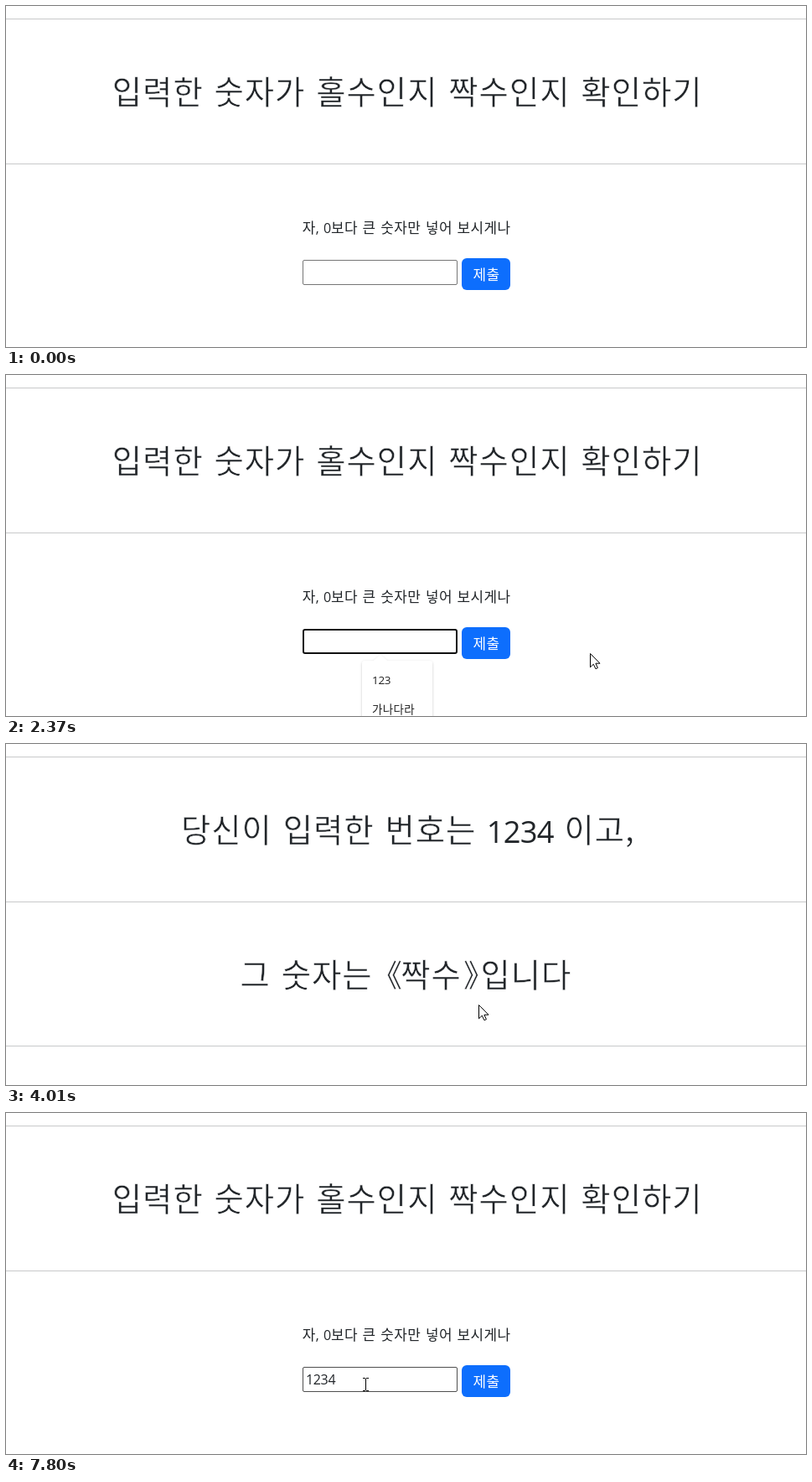
Recreate the animation shown at these times as an HTML page. Size 955 by 407 pixels, loop 8 s.

```html
<!DOCTYPE html>
<html lang="ko">
<head>
<meta charset="utf-8">
<title>홀수 짝수 확인</title>
<style>
html, body { margin: 0; width: 100%; height: 100%; overflow: hidden; background: #fff; }
svg { display: block; }
text {
  font-family: "Noto Sans CJK KR", "Noto Sans CJK", "Noto Sans KR", sans-serif;
  font-weight: 350; letter-spacing: .0253em; fill: #212529;
  text-spacing-trim: space-all; white-space: pre;
}
/* A thin white outline slims the strokes of the heading. */
.big { font-size: 38.4px; word-spacing: .03em; stroke: #fff; stroke-width: .5px; }
.mid { font-size: 16.93px; word-spacing: .03em; }
.num { font-family: "Open Sans", "Noto Sans", sans-serif; font-weight: 400; letter-spacing: -.022em; }
.gap { word-spacing: .12em; }
.hint { font-size: 13.5px; fill: #222; }
.quote { font-size: 37px; }
</style>
</head>
<body>
<svg width="955" height="407" viewBox="0 0 955 407">
  <defs>
    <filter id="soft" x="-20%" y="-20%" width="140%" height="140%">
      <feDropShadow dx="0" dy="1" stdDeviation="1.5" flood-color="#000" flood-opacity=".22"/>
    </filter>
  </defs>
  <rect width="955" height="407" fill="#fff"/>
  <g fill="#c8c9ca">
    <rect y="15" width="955" height="1"/>
    <rect y="188" width="955" height="1"/>
  </g>

  <g id="ask">
    <text class="big" x="126.8" y="117">입력한 숫자가 홀수인지 짝수인지 확인하기</text>
    <text class="mid" x="353.8" y="271">자<tspan class="num gap" font-size="16">, 0</tspan>보다 큰 숫자만 넣어 보시게나</text>
    <rect id="field" fill="#fff"/>
    <text id="typed" class="num" x="358" y="324" font-size="16"></text>
    <rect id="button" x="544" y="301" width="58" height="38" rx="6"/>
    <text class="mid" x="557.6" y="326.5" style="fill:#fff">제출</text>
    <g id="list">
      <path id="panel" fill="#fff" filter="url(#soft)"/>
      <text class="hint num" x="437" y="369">123</text>
      <text id="second" class="hint" x="437" y="404">가나다라</text>
    </g>
  </g>

  <g id="answer">
    <rect y="360" width="955" height="1" fill="#c8c9ca"/>
    <text class="big" x="209" y="117">당신이 입력한 번호는</text>
    <text class="num" x="573.8" y="118" font-size="36.3">1234</text>
    <text class="big" x="666.4" y="117">이고,</text>
    <text class="big" x="279.5" y="290">그 숫자는</text>
    <text class="big quote" x="436" y="290">《</text>
    <text class="big" x="471.3" y="290">짝수</text>
    <text class="big quote" x="546" y="290">》</text>
    <text class="big" x="566.5" y="290">입니다</text>
  </g>

  <g id="mouse">
    <circle id="press" cx="-2.5" cy="-.5" r="12" fill="#ff0" fill-opacity=".5"/>
    <path id="arrow" d="M.5 .5V16.8L4.3 13.2 6.9 18.7 9.4 17.6 6.9 12.2H12z" fill="#fff" stroke="#000"/>
    <path id="beam" d="M-3.5 -7.5H-.5M.5 -7.5H3.5M0 -7V7M-3.5 7.5H-.5M.5 7.5H3.5" fill="none" stroke="#000"/>
    <g id="hand" stroke="#000">
      <path d="M-2 1.5a2 2 0 0 1 4 0V8c0-2 4-1.5 4 .5 0-1.7 3.5-1.2 3.5.8 0-1.5 3-1 3 1V15c0 3-2 4.5-2 7H1.5c0-3-7-8-7-10.5 0-2 2.5-1.5 3.5.5z" fill="#fff" stroke-width="1.2"/>
      <path d="M2 8V11.5M6 8.5V11.5M9.5 9.3V12" fill="none"/>
    </g>
  </g>
</svg>
<script>
const LOOP = 8000, STEP = 70, FIRST = 860;
const $ = id => document.getElementById(id);
const show = (id, on) => $(id).style.display = on ? '' : 'none';
const within = (t, a, b) => t >= a && t < b;
const clamp = k => Math.max(0, Math.min(1, k));
const ramp = (t, start) => clamp((t - start) / 150);

function attrs(id, o) {
  for (const k in o) $(id).setAttribute(k, o[k]);
}

const easeIn = k => k ** 2.77;
const easeOut = k => 1 - (1 - k) ** 2;
const easeBoth = k => k * k * (3 - 2 * k);

// The pointer rests at the end of a move until "until".
const inField = [472.5, 317], aside = [697, 332], onButton = [564, 311];
const moves = [
  { from: 860, to: 1200, until: 1870, a: [538, 394], b: inField, ease: easeOut, bend: .4 },
  { from: 1870, to: 2330, until: 2930, a: inField, b: aside, ease: easeBoth, bend: .3 },
  { from: 2930, to: 3310, until: 4010, a: aside, b: onButton, ease: easeBoth, bend: 0 },
  { from: 4010, to: 4570, until: 4640, a: onButton, b: [127, 0], ease: easeIn, bend: .6 },
  { from: 7020, to: 7790, until: LOOP, a: [190, 92], b: [429.5, 324], ease: easeOut, bend: .3 }
];

function pointer(t) {
  const m = moves.find(m => within(t, m.from, m.until));
  if (!m) return null;
  // The screen refreshes the pointer in fixed steps.
  const snapped = FIRST + Math.floor((t - FIRST + 10) / STEP) * STEP;
  const u = m.ease(clamp((snapped - m.from) / (m.to - m.from)));
  const v = u + m.bend * u * (1 - u);
  return [m.a[0] + (m.b[0] - m.a[0]) * u, m.a[1] + (m.b[1] - m.a[1]) * v];
}

// Button shade: 0 normal, 1 hover, 1.35 pressed.
const shade = t => ramp(t, 2060) - ramp(t, 2130) + ramp(t, 3170) - ramp(t, 6810)
  + .35 * (ramp(t, 3740) - ramp(t, 6740));

const inside = (p, [x, y, w, h]) => p && within(p[0], x, x + w) && within(p[1], y, y + h);
const FIELD = [354, 303, 185, 30], BUTTON = [544, 301, 58, 38];
const ASK_TEXT = [[126, 82, 704, 44], [354, 255, 248, 22]];
const ANSWER_TEXT = [[209, 82, 538, 44], [280, 255, 396, 44]];

const panelPath = bottom =>
  `M429 341H439L447 334 455 341H505a4 4 0 0 1 4 4V${bottom - 4}a4 4 0 0 1-4 4H429a4 4 0 0 1-4-4V345a4 4 0 0 1 4-4z`;

function draw(t) {
  const asking = !within(t, 3880, 6890);
  show('ask', asking);
  show('answer', !asking);

  const p = pointer(t);
  const focused = within(t, 1740, 3740);
  const over = asking && inside(p, FIELD);
  const w = focused ? 2 : 1;
  attrs('field', {
    x: 354 + w / 2, y: 303 + w / 2, width: 185 - w, height: 30 - w,
    rx: focused ? 2 : 1.5, 'stroke-width': w,
    stroke: focused ? '#101010' : over ? '#4f4f4f' : '#767676'
  });

  const typed = t < 2500 ? 0 : Math.min(4, 1 + Math.floor((t - 2500) / 140));
  $('typed').textContent = '1234'.slice(0, typed);
  show('list', t >= 1870 && typed < 4);
  show('second', !typed);
  attrs('panel', { d: panelPath(typed ? 385 : 460) });

  const s = shade(t);
  attrs('button', { fill: `rgb(${13 - 2 * s},${110 - 16 * s},${253 - 38 * s})` });

  show('mouse', !!p);
  if (!p) return;
  const hand = asking && inside(p, BUTTON);
  const beam = over || (asking ? ASK_TEXT : ANSWER_TEXT).some(r => inside(p, r));
  show('hand', hand);
  show('beam', beam);
  show('arrow', !hand && !beam);
  show('press', within(t, 1660, 1740) || within(t, 3740, 3810));
  attrs('mouse', { transform: `translate(${p[0]} ${p[1]})` });
}

const start = performance.now();
function tick() {
  draw((performance.now() - start) % LOOP);
  requestAnimationFrame(tick);
}
tick();
</script>
</body>
</html>
```
